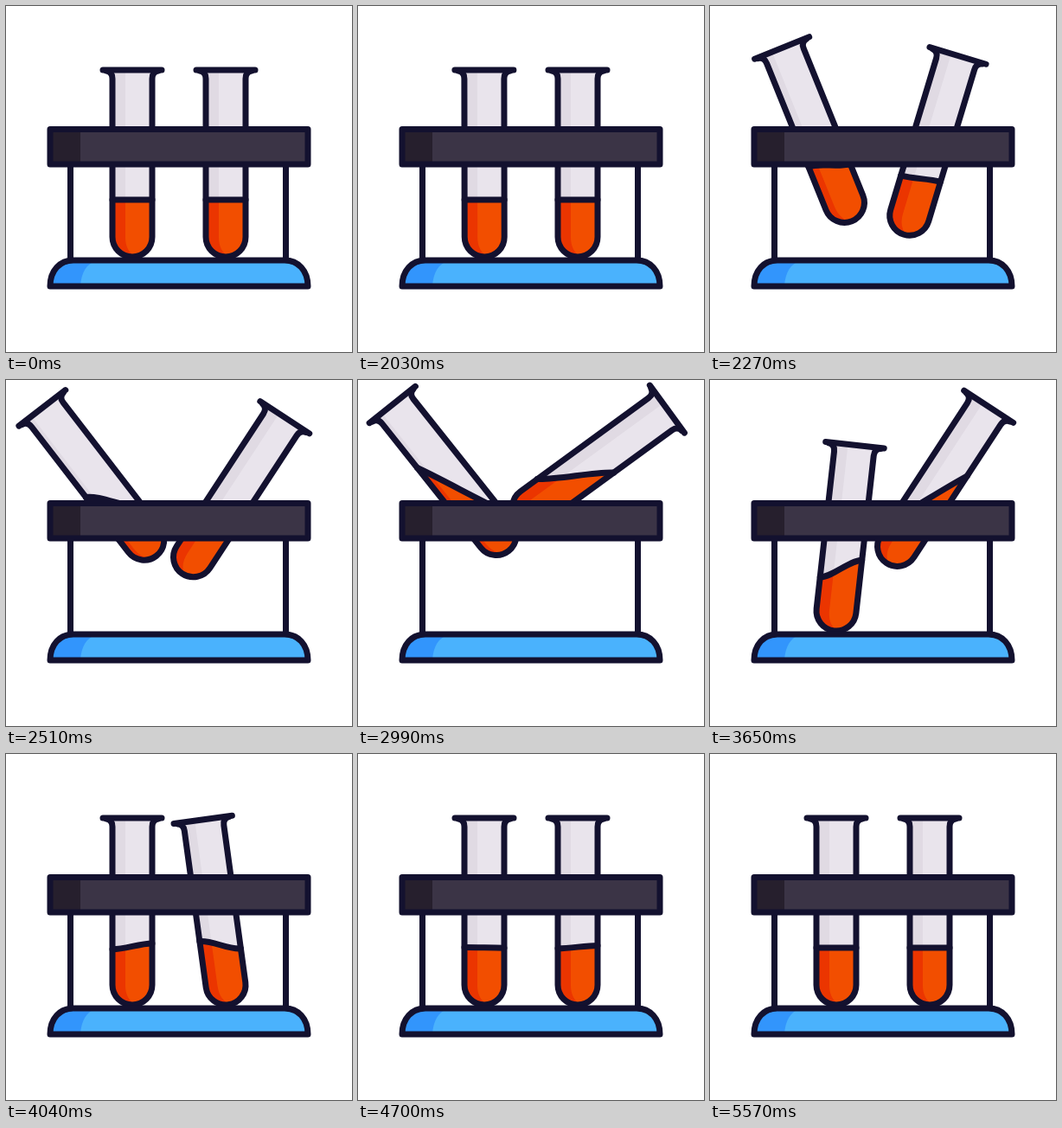
These frames come from a looping animation (400 px wide and 400 px high, 5630 ms). An HTML page:

```html
<!DOCTYPE html>
<html lang="en">
<head>
<meta charset="utf-8">
<title>Test tubes</title>
<style>
  html, body { margin: 0; width: 100%; height: 100%; overflow: hidden; background: #fff; }
  svg { display: block; width: 100vw; height: 100vh; }
  .line { fill: none; stroke: #13112f; stroke-width: 7; stroke-linecap: round; stroke-linejoin: round; }
</style>
</head>
<body>
<svg viewBox="0 0 400 400">
  <path class="line" d="M74.5 184V294M323.5 184V294"/>
  <g id="tubes"></g>
  <path fill="#4ab2fd" d="M51 324H349C349 306 338 294 322 294H78C62 294 51 306 51 324Z"/>
  <path fill="#3295fc" d="M51 324H86C87 308 93 298 105 294H78C62 294 51 306 51 324Z"/>
  <path class="line" d="M51 324H349C349 306 338 294 322 294H78C62 294 51 306 51 324Z"/>
  <path fill="#3b3446" d="M51 142.5H349V183H51Z"/>
  <path fill="#261f2d" d="M51 142.5H86V183H51Z"/>
  <path class="line" d="M51 142.5H349V183H51Z"/>
</svg>
<script>
const LOOP = 5630;
const FLOOR = 267;   // y of the round bottom's centre at rest
const LEVEL = 43;    // liquid height above that centre
const FALL = 660, ROCK = 500;
const LAG = 260, SPILL = 560, WAVE = 400;

const tubes = [
  { x: 146, side: -1, start: 2030, peak: 2730, tilt: 42.7, lift: 97, drift: -15 },
  { x: 254, side: 1, start: 2050, peak: 3190, tilt: 56, lift: 126, drift: 54 }
];

// 0 to 1 at the peak with a soft stop, then an accelerating drop back to 0.
function swing(t, start, peak, fall, power = 1) {
  if (t <= start || t >= peak + fall) return 0;
  if (t < peak) return Math.sin((t - start) / (peak - start) * Math.PI / 2) ** power;
  return 1 - ((t - peak) / fall) ** 2.5;
}

function tiltAt({ side, start, peak, tilt }, t) {
  const s = t - peak - FALL;
  const rock = s > 0 && s < ROCK ? 0.15 * Math.sin(s / ROCK * Math.PI) : 0;
  return side * tilt * (swing(t, start, peak, FALL) - rock);
}

// Height of the liquid at the right wall minus the left wall.
function sloshAt({ side, start, peak }, t) {
  const s = t - peak - LAG - SPILL;
  const ripple = s > 0 ? 35 * Math.exp(-s / 300) * Math.sin(s / WAVE * 2 * Math.PI) : 0;
  return side * (100 * swing(t, start, peak + LAG, SPILL, 2) - ripple);
}

function build(tube, i) {
  const g = document.createElementNS('http://www.w3.org/2000/svg', 'g');
  g.innerHTML = `
    <clipPath id="glass${i}"><path d="M-23 -190V0A23 23 0 0 0 23 0V-190Z"/></clipPath>
    <clipPath id="liquid${i}"><path class="surface"/></clipPath>
    <g clip-path="url(#glass${i})">
      <path fill="#e9e4ec" d="M-24 -190H24V24H-24Z"/>
      <path class="shade" fill="#e0dae3" d="M-24 -190H-8V0H-24Z"/>
    </g>
    <g clip-path="url(#liquid${i})">
      <path fill="#f24e00" d="M-24 -190H24V24H-24Z"/>
      <path class="shade" fill="#eb3500" d="M-24 -190H-8V0Q-8 18 6 24H-24Z"/>
    </g>
    <path class="line top"/>
    <path class="line" d="M-30 -192Q-23 -191 -23 -183V0A23 23 0 0 0 23 0V-183Q23 -191 30 -192"/>
    <path class="line" d="M-34 -193H34"/>`;
  document.getElementById('tubes').append(g);
  tube.g = g;
  tube.surface = g.querySelector('.surface');
  tube.top = g.querySelector('.top');
  tube.shades = g.querySelectorAll('.shade');
}

function pose(tube, t) {
  const { x, start, peak, lift, drift } = tube;
  const angle = tiltAt(tube, t), slosh = sloshAt(tube, t);
  const dx = drift * swing(t, start, peak, FALL) ** 0.7;
  const dy = lift * swing(t, start, peak, FALL, 1.35);
  tube.g.setAttribute('transform', `translate(${x - dx} ${FLOOR - dy}) rotate(${angle})`);

  const mid = LEVEL + Math.abs(slosh) / 4;
  const l = slosh / 2 - mid, r = -slosh / 2 - mid;
  const bend = (r - l) * Math.min(0.3, Math.abs(slosh) / 300);
  const top = `M-23 ${l}C-8 ${l + bend} 8 ${r - bend} 23 ${r}`;
  tube.top.setAttribute('d', top);
  tube.surface.setAttribute('d', top + 'V0A23 23 0 0 1 -23 0Z');

  // The shaded strip narrows as the tube leans left.
  const slide = 0.2 * Math.min(angle, 0);
  tube.shades.forEach(s => s.setAttribute('transform', `translate(${slide} 0)`));
}

tubes.forEach(build);

const begin = performance.now();
function draw(now) {
  const t = Math.max(0, now - begin) % LOOP;
  tubes.forEach(tube => pose(tube, t));
  requestAnimationFrame(draw);
}
draw(begin);
</script>
</body>
</html>
```
